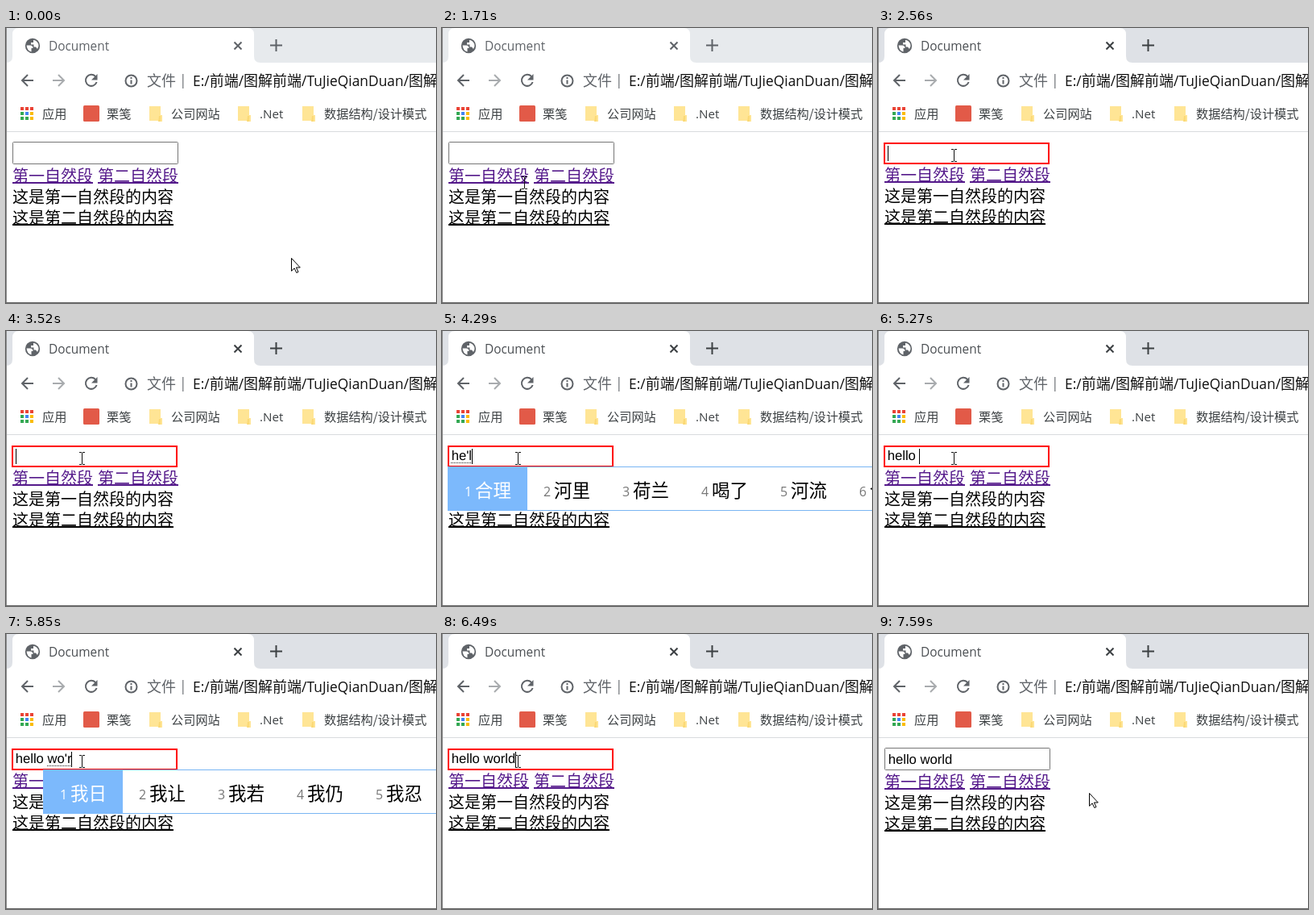
These frames come from a looping animation (534x341 px, 8 s). An HTML page:

```html
<!DOCTYPE html>
<html lang="zh-CN">
<head>
<meta charset="utf-8">
<title>Document</title>
<style>
html, body { margin: 0; width: 100%; height: 100%; overflow: hidden; background: #fff; }
svg { display: block; width: 534px; height: 341px; }
text { font-family: "Noto Sans CJK SC", "Noto Sans CJK", sans-serif; white-space: pre; }
.ui { font-family: "Open Sans", "Noto Sans CJK SC", sans-serif; }
#page text { font-weight: 350; }
.field { font: 16.667px "Liberation Sans", Arial, sans-serif; font-kerning: none; text-rendering: geometricPrecision; }
</style>
</head>
<body>
<svg id="stage" viewBox="0 0 534 341" xmlns="http://www.w3.org/2000/svg">
  <rect width="534" height="341" fill="#fff"/>
  <rect id="strip" width="534" height="43"/>
  <path d="M0 43Q8 43 8 35V8Q8 0 16 0H300Q308 0 308 8V35Q308 43 316 43Z" fill="#fff"/>
  <circle cx="33" cy="22" r="9.2" fill="#5f6368"/>
  <path d="M25.500 21.500H30Q33.500 21.500 33.500 25H31.500V29.500Q26 28 25.500 21.500ZM34 14.800Q40.500 16.500 40.500 22.500L39 26L37 23.500H34.500V20.500H31V18H34Z" fill="#fff"/>
  <text id="title" class="ui" x="53" y="28" font-size="15.4">Document</text>
  <path id="tabIcons" d="M283.500 17.500l9 9m0-9l-9 9M328 21.500h15M335.500 14v15" fill="none" stroke-width="2"/>

  <g fill="none" stroke="#5f6368" stroke-width="2">
    <path d="M34 65H20M27 58L20 65l7 7"/>
    <path d="M58 65h14M65 58L72 65l-7 7" stroke="#a8abae"/>
    <path d="M111 60A7 7 0 1 0 112.600 67"/>
    <circle cx="155.500" cy="65.500" r="7"/>
    <path d="M155.500 64.500v5M155.500 61v2"/>
  </g>
  <path d="M113.500 57v7.500h-7.500z" fill="#5f6368"/>
  <text x="175" y="72.300" font-size="18" fill="#5f6368">文件</text>
  <rect x="219" y="57" width="1.500" height="18" fill="#8b8e92"/>
  <text id="url" class="ui" x="232" y="72.300" font-size="17.400" fill="#111"></text>

  <g id="bookmarks"></g>
  <rect y="128" width="534" height="1" fill="#d9dbde"/>

  <g id="page"></g>
  <rect id="box" fill="#fff"/>
  <text id="typed" class="field"></text>
  <path id="dots" stroke="#222" stroke-dasharray="1 1" fill="none"/>
  <rect id="caret" y="146" width="1" height="19"/>
  <g id="panel"></g>

  <rect width="1" height="341" fill="#8c8c8c"/>
  <rect y="340" width="534" height="1" fill="#6a6a6a"/>

  <path id="arrow" d="M.5 .5V16.300L4.100 12.900L6.800 18.500L9 17.500L6.400 12H11.300Z" fill="#fff" stroke="#000"/>
  <path id="beam" d="M0 .5h3m1 0h3M3.500 1v14M0 15.500h3m1 0h3" fill="none" stroke="#111"/>
  <path id="hand" d="M5.500 13V2.500a1.500 1.500 0 0 1 3 0V8.500a1.500 1.500 0 0 1 3 .5a1.500 1.500 0 0 1 2.800 .8a1.400 1.400 0 0 1 2.200 1.200V17L14.500 22.500H7L2 15.500L.8 12.500Q2.500 10.500 4 12.500Z" fill="#fff" stroke="#000"/>
</svg>
<script>
const LOOP = 8000;
const $ = id => document.getElementById(id);
const set = (el, attrs) => { for (const k in attrs) el.setAttribute(k, attrs[k]); return el; };
function add(parent, tag, attrs, text) {
  const el = set(document.createElementNS("http://www.w3.org/2000/svg", tag), attrs);
  if (text) el.textContent = text;
  return parent.appendChild(el);
}
const show = (el, on) => set(el, { visibility: on ? "visible" : "hidden" });

// Address: CJK runs are a little larger than the Latin ones
for (const part of ["E:/", "前端", "/", "图解前端", "/TuJieQianDuan/", "图解"])
  add($("url"), "tspan", { "font-size": part.charCodeAt(0) > 255 ? 18 : 17.4 }, part);

// Bookmarks bar
const marks = $("bookmarks");
const [R, Y, G, B] = ["#ea4335", "#fbbc05", "#34a853", "#4285f4"];
[R, R, R, G, B, Y, G, G, Y].forEach((fill, i) =>
  add(marks, "rect", { x: 18 + i % 3 * 6, y: 98 + Math.floor(i / 3) * 6, width: 4, height: 4, fill }));
add(marks, "rect", { x: 96, y: 96, width: 20, height: 20, rx: 1.5, fill: "#e25a48" });
for (const x of [178, 288, 368]) {
  add(marks, "path", { d: `M${x} 97h14v11h2v8h-2l-1 -1h-13z`, fill: "#ffe595" });
  add(marks, "path", { d: `M${x + 12} 109h2v7h-3z`, fill: "#fbd976" });
}
const labels = [[45, "应用"], [125, "栗笺"], [205, "公司网站"], [315, ".Net"], [395, "数据结构/设计模式"]];
for (const [x, s] of labels)
  add(marks, "text", { x, y: 112, "font-size": 15.2, fill: "#3c4043", class: s[0] === "." ? "ui" : "" }, s);

// Page content
function line(x, y, s, fill, underlined) {
  add($("page"), "text", { x, y, "font-size": 20, fill }, s);
  if (underlined) add($("page"), "rect", { x, y, width: s.length * 20, height: 2, fill });
}
line(8, 191, "第一自然段", "#551a8b", true);
line(114, 191, "第二自然段", "#551a8b", true);
line(8, 217, "这是第一自然段的内容", "#000");
line(8, 243, "这是第二自然段的内容", "#000", true);

// [start, pointer, x, y]
const pointers = [
  [0, "arrow", 354, 285], [430, "", 0, 0], [1020, "arrow", 41, 314], [1170, "arrow", 32, 296],
  [1450, "arrow", 132, 270], [1590, "beam", 112, 224], [1710, "beam", 99, 184],
  [1830, "hand", 88, 172], [1990, "beam", 91, 156], [2130, "beam", 91, 153],
  [2250, "beam", 91, 150], [7070, "arrow", 200, 183], [7200, "arrow", 248, 193],
  [7350, "arrow", 262, 197]
];
// [start, committed text, composing text, candidates]
const typing = [
  [0, "", "", ""],
  [4020, "", "h", "和 好 会 还 后 很 或"],
  [4160, "", "he", "和 何 喝 合 河 核 贺"],
  [4290, "", "he'l", "合理 河里 荷兰 喝了 河流 合力"],
  [4440, "", "he'l'l", "合理了 和理论 和力量 河流里 喝了两"],
  [4560, "", "he'l'l'o", "合理了哦 喝了两口 和理论哦 河流里哦"],
  [4680, "hello", "", ""],
  [5270, "hello ", "", ""],
  [5570, "hello ", "w", "我 为 无 问 文 万 外"],
  [5690, "hello ", "wo", "我 窝 握 卧 沃 涡 喔"],
  [5850, "hello ", "wo'r", "我日 我让 我若 我仍 我忍"],
  [6250, "hello ", "wo'r'l", "我认了 我让了 我热了 我忍了"],
  [6370, "hello ", "wo'r'l'd", "我认了的 我让了的 我热了的"],
  [6490, "hello world", "", ""]
];
const caretOff = [[2990, 3520], [6920, 7470]];
const at = (list, t) => list.filter(step => step[0] <= t).pop();
const within = (t, a, b) => t >= a && t < b;

function drawPanel(x, words) {
  const panel = $("panel");
  panel.replaceChildren();
  if (!words) return;
  add(panel, "rect", { x, y: 168, width: 534 - x, height: 55, fill: "#fff" });
  add(panel, "path", { d: `M${x} 168.5H534M${x} 222.5H534`, stroke: "#79b5f3" });
  let left = x;
  words.split(" ").forEach((word, i) => {
    const cell = 53 + word.length * 22.5;
    if (!i) add(panel, "rect", { x, y: 168, width: cell + 1, height: 55, fill: "#7cb9fc" });
    add(panel, "text", { x: left + 21, y: 205, "font-size": 16, class: "ui", fill: i ? "#777" : "#fff" }, String(i + 1));
    add(panel, "text", { x: left + 34, y: 206, "font-size": 22.5, fill: i ? "#000" : "#fff" }, word);
    left += cell;
  });
}

function width(s) {
  $("typed").textContent = s.replace(/ /g, "\u00a0");
  return s ? $("typed").getComputedTextLength() : 0;
}

function render(t) {
  const active = t >= 2560;
  const focus = within(t, 2560, 7590);
  const hover = within(t, 1990, 2560);

  set($("strip"), { fill: active ? "#dee1e6" : "#e7eaed" });
  set($("title"), { fill: active ? "#4a4e52" : "#5f6368" });
  set($("tabIcons"), { stroke: active ? "#3c4043" : "#5f6368" });
  set($("page"), { transform: `translate(0 ${focus ? -1 : 0})` });
  set($("box"), focus
    ? { x: 8, y: 143, width: 204, height: 25, rx: 0, stroke: "#f00", "stroke-width": 2 }
    : { x: 8.5, y: 141.5, width: 205, height: 27, rx: 1, stroke: hover ? "#4f4f4f" : "#767676", "stroke-width": 1 });

  const [, done, draft, words] = at(typing, t);
  const start = 11.67 + width(done);
  const end = 11.67 + width(done + draft);
  set($("typed"), { x: focus ? 11.67 : 12.67, y: focus ? 160 : 161 });
  set($("dots"), { d: draft ? `M${Math.floor(start)} 163.5H${Math.floor(end)}` : "" });
  set($("caret"), { x: Math.max(12, Math.floor(end)) });
  show($("caret"), focus && !caretOff.some(([a, b]) => within(t, a, b)));
  drawPanel(done ? 46 : 7, words);

  const [, kind, x, y] = at(pointers, t);
  for (const id of ["arrow", "beam", "hand"])
    set(show($(id), id === kind), { transform: `translate(${x} ${y})` });
}

const began = performance.now();
function tick() {
  render((performance.now() - began) % LOOP);
  requestAnimationFrame(tick);
}
tick();
</script>
</body>
</html>
```
